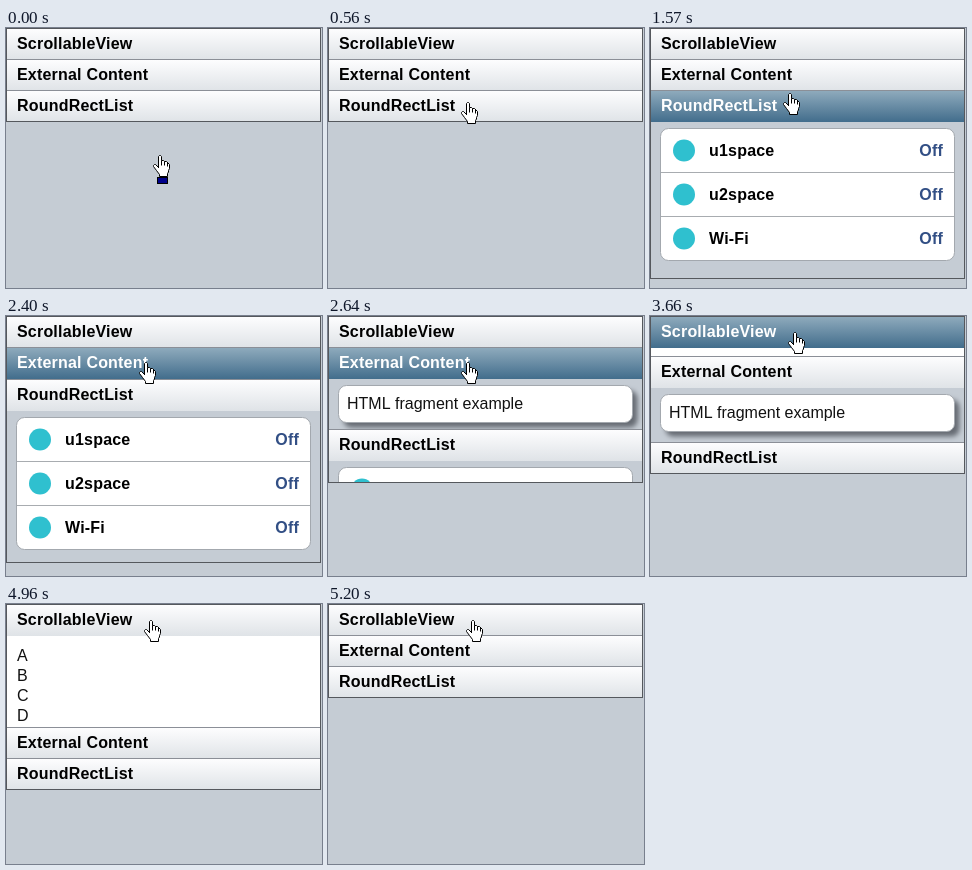
An HTML page with a canvas that plays this animation: 316 by 260 pixels, repeating every 5.8 s.

```html
<!DOCTYPE html>
<html lang="en">
<head>
<meta charset="utf-8">
<title>Accordion</title>
<style>
  html, body { margin: 0; width: 100%; height: 100%; overflow: hidden; background: #c5ccd4; }
  canvas { display: block; width: 316px; height: 260px; }
</style>
</head>
<body>
<canvas id="stage"></canvas>
<script>
const W = 316, H = 260, LOOP = 5800;
const BAR = 31, PAGE = '#c5ccd4';
const FONT = '16px "Liberation Sans", Arial, sans-serif';
const TITLES = ['ScrollableView', 'External Content', 'RoundRectList'];
const OPEN = [101, 60, 157];     // pane heights at rest
const CLOSING = [101, 60, 152];  // pane heights when a closing wipe begins

// Pane switches: which pane opens (-1 for none) and the wipe's phase at its first step
const SWITCHES = [
  { pane: 2, start: 890, steps: 6, phase: 0.053 },
  { pane: 1, start: 2400, steps: 6, phase: -0.048 },
  { pane: 0, start: 3660, steps: 5, phase: 0.194 },
  { pane: -1, start: 4960, steps: 5, phase: 0.194 }
];

const MOVES = [
  { start: 260, end: 560, steps: 6, from: [147, 127], to: [133, 74] },
  { start: 1390, end: 1940, steps: 9, from: [133, 74], to: [133, 46] },
  { start: 2900, end: 3200, steps: 6, from: [133, 46], to: [138, 16] }
];

const HAND = new Path2D('M5.5 1.5L6.5 .5H7.5L8.5 1.5V5.5H10.5L11.5 6.5H13.5L16.5 9.5V13.5' +
  'L15.5 15.5V17L14.5 18.5V21.5H6.5V19.5L3.5 15.5L.5 11.5V10.5L1.5 9.5H2.5L5.5 12.5Z');
const KNUCKLES = new Path2D('M5.5 9V13M8.5 5.5V10.5M11.5 6.5V10.5M14.5 8V11.5');

const canvas = document.getElementById('stage');
const ctx = canvas.getContext('2d');
const dpr = window.devicePixelRatio || 1;
canvas.width = W * dpr;
canvas.height = H * dpr;

const sineEase = x => (1 - Math.cos(Math.PI * Math.max(0, Math.min(1, x)))) / 2;

function panesAt(t) {
  const heights = [0, 0, 0];
  let last = -1, current = null;
  for (const s of SWITCHES) {
    if (t < s.start) break;
    last = current ? current.pane : -1;
    current = s;
  }
  if (!current) return { heights, active: -1 };
  const step = Math.floor((t - current.start) / 60);
  const p = step >= current.steps - 1 ? 1 : sineEase(current.phase + step * 0.2);
  if (last >= 0) heights[last] = Math.round(CLOSING[last] * (1 - p));
  if (current.pane >= 0) heights[current.pane] = Math.max(1, Math.round(OPEN[current.pane] * p));
  return { heights, active: current.pane };
}

function cursorAt(t) {
  let pos = MOVES[0].from;
  for (const m of MOVES) {
    if (t < m.start) break;
    const gap = (m.end - m.start) / (m.steps - 1);
    const p = Math.min(1, (Math.floor((t - m.start) / gap) + 1) / m.steps);
    pos = m.from.map((v, i) => Math.round(v + (m.to[i] - v) * p));
  }
  return pos;
}

function text(str, x, y, color, bold, align = 'left') {
  ctx.font = (bold ? 'bold ' : '') + FONT;
  ctx.letterSpacing = bold ? '0.2px' : '0px';
  ctx.textAlign = align;
  ctx.fillStyle = color;
  ctx.fillText(str, x, y);
}

function card(y, h, shadow) {
  ctx.beginPath();
  ctx.roundRect(10.5, y + 0.5, 294, h - 1, 8);
  ctx.save();
  if (shadow) {
    ctx.shadowColor = '#666b73';
    ctx.shadowBlur = 5 * dpr;
    ctx.shadowOffsetX = ctx.shadowOffsetY = 5 * dpr;
  }
  ctx.fillStyle = '#fff';
  ctx.fill();
  ctx.restore();
  ctx.strokeStyle = '#a3a8ae';
  ctx.stroke();
}

// The bar's last row overlaps whatever follows it
function drawHeader(title, y, active) {
  const g = ctx.createLinearGradient(0, y + 1, 0, y + 1 + BAR);
  g.addColorStop(0, active ? '#8eaabc' : '#fdfdfe');
  g.addColorStop(1, active ? '#426d8c' : '#dfe3e7');
  ctx.fillStyle = g;
  ctx.fillRect(1, y + 1, 313, BAR);
  ctx.fillStyle = '#8b8f97';
  ctx.fillRect(1, y, 313, 1);
  text(title, 11, y + 21, active ? '#fff' : '#000', true);
}

const PANES = [
  function letters(y, h) {
    ctx.fillStyle = '#fff';
    ctx.fillRect(1, y, 313, h);
    [...'ABCDE'].forEach((c, i) => text(c, 11, y + 26 + i * 20, '#111', false));
  },
  function fragment(y) {
    card(y + 7, 38, true);
    text('HTML fragment example', 19, y + 31, '#111', false);
  },
  function list(y) {
    card(y + 7, 133, false);
    ['u1space', 'u2space', 'Wi-Fi'].forEach((name, i) => {
      const top = y + 7 + i * 44;
      if (i) {
        ctx.fillStyle = '#a8acb0';
        ctx.fillRect(11, top, 293, 1);
      }
      ctx.fillStyle = '#2fc0cf';
      ctx.beginPath();
      ctx.arc(34, top + 22.5, 11, 0, Math.PI * 2);
      ctx.fill();
      text(name, 59, top + 28, '#000', true);
      text('Off', 293, top + 28, '#324f85', true, 'right');
    });
  }
];

function drawPane(i, y, h) {
  if (h <= 1) return;
  ctx.save();
  ctx.beginPath();
  ctx.rect(1, y + 1, 313, h - 1);
  ctx.clip();
  PANES[i](y, h);
  ctx.restore();
}

function drawFrame(h) {
  ctx.strokeStyle = '#55585d';
  ctx.strokeRect(0.5, 0.5, 314, h);
}

function drawCursor([x, y]) {
  ctx.save();
  ctx.translate(x, y);
  ctx.fillStyle = '#fff';
  ctx.fill(HAND);
  ctx.strokeStyle = '#000';
  ctx.stroke(HAND);
  ctx.stroke(KNUCKLES);
  if (y > 93) {
    ctx.fillStyle = '#000';
    ctx.fillRect(4, 22, 11, 7);
    ctx.fillStyle = '#00008b';
    ctx.fillRect(5, 23, 9, 5);
  }
  ctx.restore();
}

function draw(t) {
  ctx.setTransform(dpr, 0, 0, dpr, 0, 0);
  ctx.lineWidth = 1;
  ctx.fillStyle = PAGE;
  ctx.fillRect(0, 0, W, H);

  const { heights, active } = panesAt(t);
  let y = 0;
  TITLES.forEach((title, i) => {
    drawHeader(title, y, i === active);
    y += BAR;
    drawPane(i, y, heights[i]);
    y += heights[i];
  });
  drawFrame(y);
  drawCursor(cursorAt(t));
}

const begin = performance.now();
function tick() {
  draw((performance.now() - begin) % LOOP);
  requestAnimationFrame(tick);
}
tick();
</script>
</body>
</html>
```
